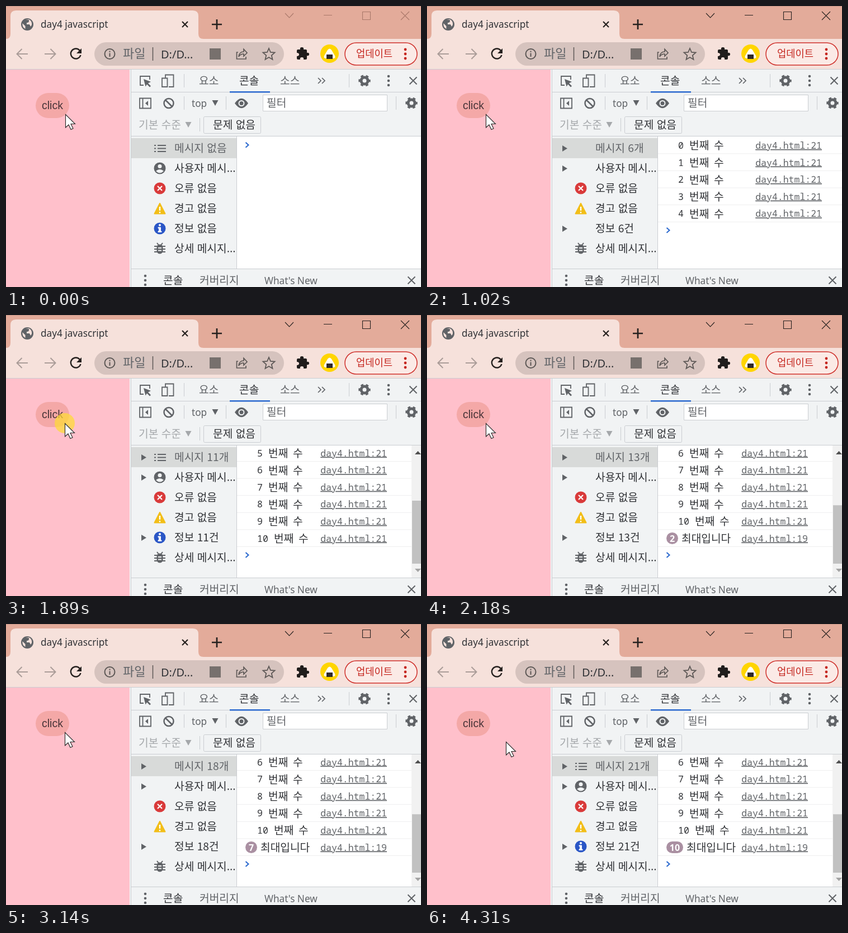
Recreate the animation shown at these times as an HTML page. Size 742 px wide and 504 px high, loop 4390 ms.

```html
<!DOCTYPE html>
<html lang="ko">
<head>
<meta charset="utf-8">
<title>Console counter</title>
<style>
html, body { margin: 0; width: 100%; height: 100%; overflow: hidden; }
svg { display: block; width: 742px; height: 504px; }
text { font: 350 19.2px "Noto Sans CJK KR", "Noto Sans CJK", sans-serif; fill: #303236; white-space: pre; }
.latin { font: 400 17.2px "Noto Sans", sans-serif; }
.mono { font: 400 16.5px "Noto Sans Mono", monospace; }
.soft { fill: #606367; }
.pale { fill: #a5a8ab; }
.line { fill: none; stroke: #606367; stroke-width: 2; }
.rule { fill: none; stroke: #cacdd1; stroke-width: 1; }
.fill { fill: #606367; }
.white { fill: #fff; }
</style>
</head>
<body>
<svg viewBox="0 0 742 504">
  <defs>
    <clipPath id="view"><path d="M413 234H742V471H413z"/></clipPath>
    <g id="gear">
      <circle r="6" fill="none" stroke="#606367" stroke-width="5"/>
      <circle r="9" fill="none" stroke="#606367" stroke-width="3.4" stroke-dasharray="4.7 4.725" stroke-dashoffset="2.35"/>
    </g>
    <g id="dots" class="fill"><circle cy="-8" r="2.3"/><circle r="2.3"/><circle cy="8" r="2.3"/></g>
    <path id="cross" d="M-6.5-6.5 6.5 6.5M6.5-6.5-6.5 6.5"/>
    <path id="down" d="M-5.5-5H5.5L0 5z"/>
  </defs>

  <!-- Title bar and tab -->
  <path fill="#e3ab9a" d="M0 0H742V60H0z"/>
  <path fill="#c9988a" d="M0 0H742V1H0z"/>
  <path fill="#f6e1db" d="M0 59Q8 59 8 50V18Q8 8 18 8H334Q344 8 344 18V50Q344 59 353 59H742V113H0z"/>
  <circle class="fill" cx="38" cy="33" r="11"/>
  <path d="M29.500 31l5 5v5q-6-3-5-10M35 25l6 0q1 5-4 5v3h5l2 4 2-3q1-7-5-10" fill="#f6e1db"/>
  <text class="latin" x="62" y="39">day4 javascript</text>
  <g fill="none" stroke="#26211f" stroke-width="2.2">
    <path d="M315 28l10 10M325 28l-10 10"/>
    <path d="M368 33H386M377 24V42" stroke-width="2.7"/>
  </g>
  <path id="controls" fill="none" stroke-width="1.1" d="M499 13l7.500 8 7.500-8M568 16.500H583M637.500 10.500H651.500V24.500H637.500zM706 10l15 15M721 10l-15 15"/>

  <!-- Address bar -->
  <g fill="none" stroke="#aa9c98" stroke-width="2">
    <path d="M39 86H20M28.500 77l-9 9 9 9M69 86H88M79.500 77l9 9-9 9"/>
    <path stroke="#26211f" stroke-width="2.4" d="M132 80A9 9 0 1 0 133.500 88"/>
  </g>
  <path fill="#26211f" d="M135 76v9h-9z"/>
  <rect x="158" y="65" width="339" height="42" rx="21" fill="#d6c3be"/>
  <g fill="none" stroke="#5c5755" stroke-width="2">
    <circle cx="185.500" cy="86" r="9"/>
    <path d="M185.500 84.500V91M185.500 80.500V82.700"/>
    <path stroke-width="1.500" d="M262.500 74V98"/>
    <path d="M415 83H412.500V95H429V91M416 91Q417 82 425 82V77.500L431 84 425 90V86Q419 86 416 91z" stroke-width="1.700"/>
    <path d="M470 76l3 7 7.500.6-5.700 5 1.700 7.400-6.500-3.900-6.500 3.900 1.700-7.400-5.700-5 7.500-.6z" stroke-width="1.800"/>
  </g>
  <rect x="364" y="76" width="20" height="20" fill="#77706d"/>
  <text class="soft" x="209" y="93" style="font-size:22px">파일</text>
  <text class="latin" x="277" y="94" style="font-size:20px">D:/D...</text>
  <path fill="#201d1c" d="M520 80q0-2 2-2h4q-1-4 3-4t3 4h4q2 0 2 2v4q4-1 4 2.500t-4 2.500v5q0 2-2 2h-4q1-4-3-4t-3 4h-4q-2 0-2-2v-4q4 0 4-3t-4-3z"/>
  <circle cx="578.500" cy="85.500" r="16.500" fill="#ffd500"/>
  <path class="white" d="M575 79q3.500-5 7 0l6 10q2 5-3 5H572q-5 0-3-5z"/>
  <path fill="#302a28" d="M573 87H584V95H573z"/>
  <rect x="606" y="66" width="129" height="40" rx="20" fill="#fbeae6" stroke="#cf302b" stroke-width="1.500"/>
  <text x="626" y="92" style="font-size:17.700px;fill:#c5261f">업데이트</text>
  <g fill="#c5261f"><circle cx="714" cy="78" r="2.400"/><circle cx="714" cy="86" r="2.400"/><circle cx="714" cy="94" r="2.400"/></g>

  <!-- Page -->
  <path fill="#ffc0cb" d="M0 113H222V504H0z"/>
  <rect x="53" y="156" width="60" height="45" rx="22.500" fill="#f4a8a7"/>
  <text x="64" y="184.500" style="font:19.500px 'Liberation Sans',sans-serif;fill:#473337">click</text>

  <!-- Developer tools frame -->
  <path fill="#f1f3f4" d="M221 113H742V504H221z"/>
  <path class="white" d="M413 234H742V471H413z"/>
  <path fill="#d8dad9" d="M224 237H412V273H224z"/>
  <path class="rule" d="M0 113.500H742M223.500 114V504M224 154.500H742M224 233.500H742M412.500 234V471M224 471.500H742"/>
  <path class="rule" d="M318.500 122V146M613.500 122V146M318.500 162V186M393.500 162V186M697.500 162V186M346.500 201V225" stroke-width="1.500"/>
  <path fill="#2b69cf" d="M400 153H472V155.500H400z"/>

  <g class="line">
    <path d="M246 142H240V126H257V132" stroke-width="1.800"/>
    <path d="M285 129V123.500H299.500V145H291M279 129.500H288.500V145H279z" stroke-width="1.800"/>
    <path d="M558 129l5 5-5 5M565 129l5 5-5 5" stroke-width="1.700"/>
    <path d="M239 165.500H259V183.500H239zM244.500 165V184" stroke-width="1.800"/>
    <circle cx="291" cy="174.500" r="8.500" stroke-width="2.500"/>
    <path d="M285 168.500l12 12" stroke-width="2.500"/>
    <use href="#cross" x="728" y="134"/><use href="#cross" x="725" y="492"/>
  </g>
  <g class="fill">
    <path d="M246 131l13 5-5 2.500 5 5-2 2-5-5-2.500 4z"/>
    <path d="M254 170v9l-5-4.500z"/>
    <path d="M409 174.500Q421 157 433 174.500 421 192 409 174.500"/>
    <use href="#down" x="374" y="174"/>
  </g>
  <circle cx="421" cy="174.500" r="4.500" fill="#606367" stroke="#f1f3f4" stroke-width="2"/>
  <use href="#gear" x="641" y="134"/><use href="#gear" x="725" y="174"/>
  <use href="#dots" x="684" y="134"/><use href="#dots" x="249" y="492"/>
  <text class="soft" x="345" y="141">요소</text>
  <text x="417" y="141">콘솔</text>
  <text class="soft" x="490" y="141">소스</text>
  <text class="latin soft" x="332" y="181">top</text>
  <path class="rule" d="M459.500 159.500H681.500V188.500H459.500z" style="fill:#fff"/>
  <text class="soft" x="466" y="181">필터</text>
  <text class="pale" x="237" y="220">기본 수준</text>
  <use href="#down" x="326" y="213" class="pale"/>
  <rect x="353.500" y="198.500" width="102" height="30" rx="2" class="rule"/>
  <text x="370" y="220">문제 없음</text>
  <text x="281" y="498.500">콘솔</text>
  <text class="soft" x="346" y="498.500">커버리지</text>
  <text class="latin soft" x="462" y="498.500">What's New</text>

  <!-- Sidebar -->
  <g id="arrows" class="fill"><path d="M242 250v11l9-5.500zM242 286v11l9-5.500zM242 394v11l9-5.500z"/></g>
  <g id="icons">
    <path class="line" d="M265 250h3M271 250H286M265 255.500h3M271 255.500H286M265 261h3M271 261H286"/>
    <circle class="fill" cx="275" cy="291" r="10.500"/>
    <circle cx="275" cy="287.500" r="3.500" fill="#f1f3f4"/>
    <path d="M268 296q7-6 14 0-7 7-14 0" fill="#f1f3f4"/>
    <circle cx="275" cy="399" r="10.500" fill="#2a56c6"/>
    <path d="M273 397H276.500V404H278V405.500H272V404H273.500V398.500H272V397z" fill="#fff" stroke="#fff"/>
    <circle class="white" cx="275" cy="393" r="2"/>
  </g>
  <circle cx="275" cy="327" r="10.500" fill="#d93a3a"/>
  <path d="M271 323l8 8M279 323l-8 8" fill="none" stroke="#fff" stroke-width="2.200"/>
  <path d="M275 354l9.500 18.500H265.500z" fill="#f2be18" stroke="#f2be18" stroke-width="2" stroke-linejoin="round"/>
  <path d="M275 360V367M275 369V371.500" stroke="#fff" stroke-width="2.400"/>
  <rect class="fill" x="269.500" y="427.500" width="11" height="17" rx="5.500"/>
  <path class="line" d="M265 431H285M265 436H285M265 441H285M270 425l3 4M280 425l-3 4"/>
  <path d="M272 434H278M272 438.500H278" stroke="#f1f3f4" stroke-width="2"/>
  <text id="total" class="soft" x="301" y="262"></text>
  <text x="301" y="298">사용자 메시...</text>
  <text x="301" y="334">오류 없음</text>
  <text x="301" y="370">경고 없음</text>
  <text id="info" x="301" y="406"></text>
  <text x="301" y="442">상세 메시지...</text>

  <g id="console" clip-path="url(#view)"></g>

  <circle id="press" cx="105" cy="194" r="18" fill="#ffdc35" fill-opacity=".72"/>
  <path id="cursor" d="M.5.500V24l5.500-5 4 8.500 4-1.800-4-8.200h7.500z" fill="#fff" stroke="#222" stroke-width="1.100"/>
</svg>
<script>
const LOOP = 4390, ROW = 30.6, REFRESH = 60, MAX_ROWS = 12;
// Each click: press time, release time (ms). A release logs one message.
const clicks = [
  [70, 140], [200, 270], [330, 400], [470, 530], [600, 660], [880, 1020], [1080, 1150],
  [1220, 1280], [1350, 1420], [1620, 1680], [1750, 1820], [1890, 1960], [2100, 2180],
  [2240, 2310], [2450, 2520], [2660, 2730], [2860, 2930], [3070, 3140], [3210, 3280],
  [3500, 3570], [3710, 3780]
];
const $ = id => document.getElementById(id);
const show = (id, on) => $(id).setAttribute('visibility', on ? 'visible' : 'hidden');
const logged = t => clicks.filter(c => c[1] <= t).length;

function rowMarkup(i, y, right, repeats) {
  const limit = i === MAX_ROWS - 1;
  const link = `<text class="mono soft" x="${right}" y="${y + 5.5}" text-anchor="end" text-decoration="underline">day4.html:${limit ? 19 : 21}</text>`;
  const border = `<path d="M413 ${y + 14.5}H742" stroke="#eeeeef"/>`;
  if (!limit) {
    const x = 459 + 10 * String(i).length;
    return `${border}<text class="mono" x="449" y="${y + 5.5}">${i}</text><text x="${x}" y="${y + 7}">번째</text><text x="${x + 44}" y="${y + 7}">수</text>${link}`;
  }
  const width = repeats > 9 ? 30 : 21;
  const badge = repeats < 2 ? '' :
    `<rect x="428" y="${y - 11}" width="${width}" height="21" rx="10.5" fill="#aa90a2"/>
     <text class="latin white" x="${428 + width / 2}" y="${y + 5.5}" text-anchor="middle" style="font-size:16px;font-weight:700">${repeats}</text>`;
  const x = repeats < 2 ? 449 : 434 + width;
  return `${border}${badge}<text x="${x}" y="${y + 7}">최대입니다</text>${link}`;
}

function scrollbar(overflow) {
  const size = 187 * 237 / (237 + overflow);
  return `<path fill="#f1f1f1" d="M725 234H742V471H725z"/>
    <path fill="#c1c1c1" d="M726 ${446 - size}H742V446H726z"/>
    <path fill="#505050" d="M731 250h11l-5.500-6z"/><path fill="#a3a3a3" d="M731 455h11l-5.500 6z"/>`;
}

function consoleMarkup(rows, repeats) {
  const natural = 250.4 + ROW * (rows - 1);
  const last = Math.min(natural, 401);
  const overflow = natural - last;
  let out = '';
  for (let i = 0; i < rows; i++) {
    out += rowMarkup(i, last - ROW * (rows - 1 - i), overflow > 0 ? 681 : 706, repeats);
  }
  out += `<path d="M428.500 ${last + 25}l5 4.500-5 4.500" fill="none" stroke="#2b69cf" stroke-width="2"/>`;
  return out + (overflow > 0 ? scrollbar(overflow) : '');
}

let previous = '';
function draw(t) {
  const count = logged(t), settled = logged(t - REFRESH);
  const rows = Math.min(settled, MAX_ROWS), repeats = count - 11;
  show('arrows', count > 0);
  show('icons', count === settled);
  show('press', clicks.some(([from, to]) => t >= from && t < to));
  $('total').textContent = count ? `메시지 ${count}개` : '메시지 없음';
  $('info').textContent = count ? `정보 ${count}건` : '정보 없음';
  $('controls').setAttribute('stroke', t < 70 ? '#a9786a' : '#26211f');
  $('cursor').setAttribute('transform', t >= 4310 ? 'translate(141 211)' : `translate(${t < 70 ? 106 : 105} 194)`);
  const state = rows + ':' + repeats;
  if (state !== previous) $('console').innerHTML = consoleMarkup(rows, repeats);
  previous = state;
}

const start = performance.now();
function tick() {
  draw((performance.now() - start) % LOOP);
  requestAnimationFrame(tick);
}
tick();
</script>
</body>
</html>
```
